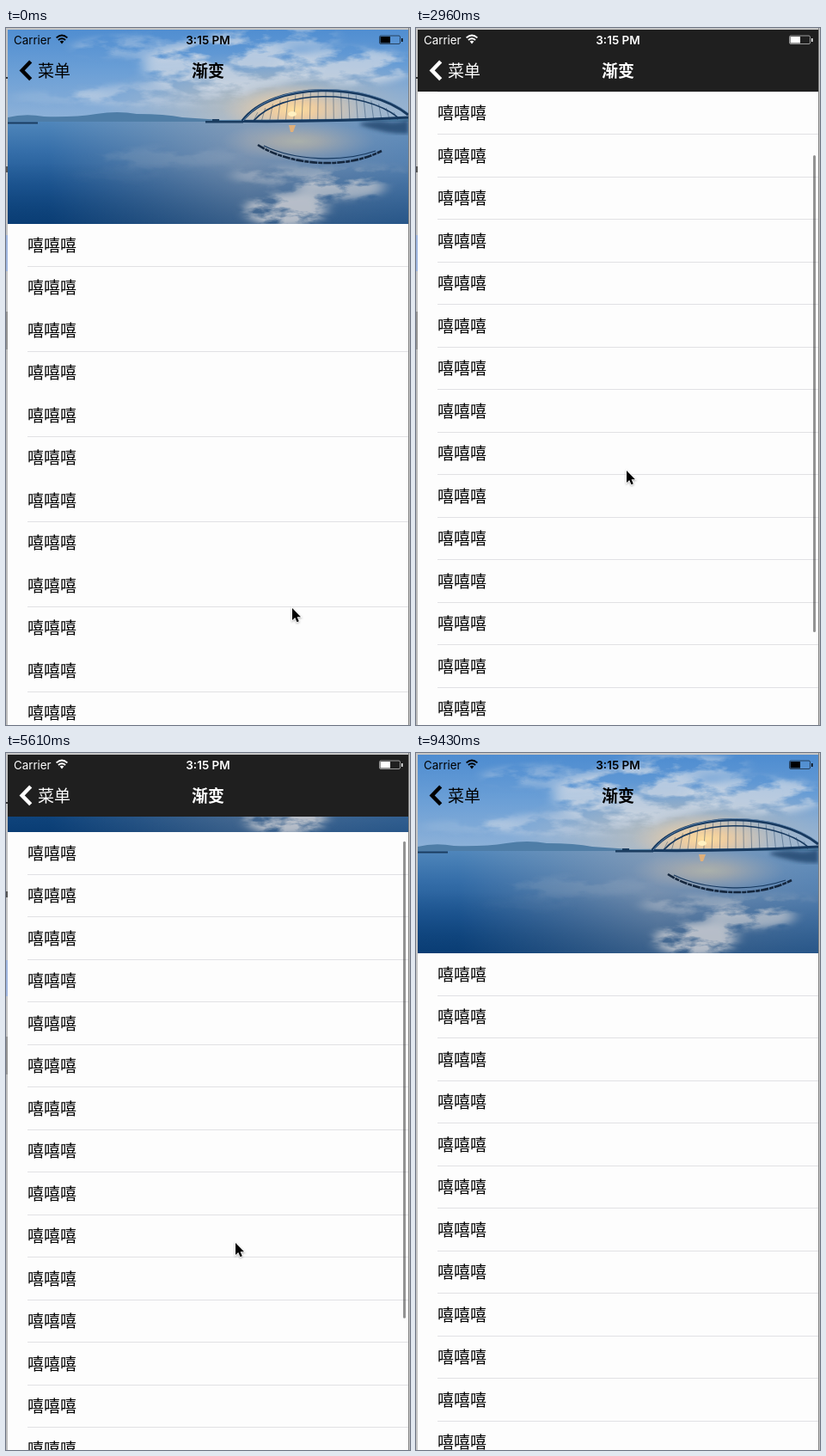
These frames come from a looping animation (470 px wide and 811 px high, 9.48 s). An HTML page:

```html
<!DOCTYPE html>
<html lang="zh">
<head>
<meta charset="utf-8">
<title>渐变</title>
<style>
html, body { margin: 0; width: 100%; height: 100%; overflow: hidden; }
body {
  position: relative; color: #000;
  background: linear-gradient(90deg, #c6c6c6 468px, #808080 468px 469px, #c9c9c9 469px);
  font-family: "Noto Sans CJK SC", "Noto Sans CJK", "Noto Sans CJK JP", sans-serif;
}
body > *, #phone > * { position: absolute; }
#edge {
  left: 0; top: 2px; width: 2px; height: 809px;
  background: linear-gradient(#c2c2c2 55px, #333 55px 57px, #c2c2c2 57px 159px, #555 159px 166px,
    #c4c4c4 166px 239px, #9fb6df 239px 281px, #c4c4c4 281px 328px, #959595 328px 372px, #bcbcbc 372px);
}
.last #edge { background: #c6c6c6; }
#phone { left: 2px; top: 2px; width: 466px; height: 809px; overflow: hidden; background: #fdfdfd; }
#photo { left: 0; top: 0; width: 466px; height: 236px; will-change: transform; }
.row, .line { left: 0; top: 0; width: 466px; }
.row { height: 50px; font-size: 19px; line-height: 48px; text-indent: 23px; background: #fdfdfd; }
.line { left: 23px; height: 1px; background: #e1e1e4; }
#bar { left: 0; top: 0; width: 466px; height: 72px; background: #1f1f1f; }
#nav { inset: 0 0 auto; height: 72px; }
#nav > * { position: absolute; white-space: nowrap; }
#nav svg { left: 0; top: 0; }
.status { top: 2px; line-height: 20px; font-family: Inter, Roboto, sans-serif; font-size: 13.3px; }
.label { top: 32px; line-height: 29px; font-size: 19px; }
.mid { left: 0; width: 466px; text-align: center; }
#thumb { left: 460px; top: 0; width: 3px; height: 555px; border-radius: 2px; background: rgba(0, 0, 0, .42); }
#cursor { left: 0; top: 0; overflow: visible; filter: drop-shadow(0 1px 1px rgba(0, 0, 0, .3)); }
</style>
</head>
<body>
<div id="edge"></div>
<div id="phone">
  <!-- drawn in stage coordinates of the resting list -->
  <svg id="photo" viewBox="2 -8 466 236">
    <defs>
      <linearGradient id="sky" x1="0" y1="0" x2="0" y2="1">
        <stop stop-color="#4a8ad0"/><stop offset=".5" stop-color="#6b9fd6"/><stop offset="1" stop-color="#8fb2d8"/>
      </linearGradient>
      <linearGradient id="water" x1="0" y1="0" x2="0" y2="1">
        <stop stop-color="#4f86bb"/><stop offset=".3" stop-color="#346da8"/>
        <stop offset=".65" stop-color="#1c5490"/><stop offset="1" stop-color="#083a70"/>
      </linearGradient>
      <linearGradient id="haze" x1="0" x2="1">
        <stop offset=".1" stop-color="#a5abb8" stop-opacity="0"/><stop offset=".6" stop-color="#a5abb8" stop-opacity=".6"/>
        <stop offset="1" stop-color="#7f9dc0" stop-opacity=".5"/>
      </linearGradient>
      <linearGradient id="deep" x1="0" y1="0" x2="0" y2="1">
        <stop offset=".4" stop-color="#0b4078" stop-opacity="0"/><stop offset="1" stop-color="#0b4078" stop-opacity=".5"/>
      </linearGradient>
      <radialGradient id="sun">
        <stop stop-color="#ffdf9c"/><stop offset=".3" stop-color="#f6cf9c" stop-opacity=".85"/>
        <stop offset="1" stop-color="#dccabc" stop-opacity="0"/>
      </radialGradient>
      <filter id="wisps" x="-30%" y="-30%" width="160%" height="160%" color-interpolation-filters="sRGB">
        <feGaussianBlur in="SourceGraphic" stdDeviation="9 5" result="soft"/>
        <feTurbulence type="fractalNoise" baseFrequency=".022 .055" numOctaves="5" seed="8"/>
        <feColorMatrix values="0 0 0 0 1  0 0 0 0 1  0 0 0 0 1  4.5 0 0 0 -1.6"/>
        <feComposite in="soft" operator="in"/>
        <feComposite in="soft" operator="in"/>
      </filter>
      <filter id="soft"><feGaussianBlur stdDeviation="2"/></filter>
    </defs>
    <rect x="2" y="-9" width="466" height="118" fill="url(#sky)"/>
    <ellipse cx="320" cy="88" rx="210" ry="62" fill="url(#sun)" opacity=".45"/>
    <g filter="url(#wisps)" fill="#d3dbe6">
      <ellipse cx="160" cy="22" rx="90" ry="16" opacity=".6"/>
      <ellipse cx="255" cy="46" rx="100" ry="30" opacity=".85"/>
      <ellipse cx="310" cy="10" rx="80" ry="16" opacity=".75"/>
      <ellipse cx="400" cy="45" rx="80" ry="24" opacity=".85"/>
      <ellipse cx="180" cy="78" rx="110" ry="16" opacity=".65"/>
      <ellipse cx="60" cy="80" rx="60" ry="10" opacity=".4"/>
    </g>
    <ellipse cx="336" cy="95" rx="85" ry="30" fill="url(#sun)"/>
    <path d="M2 104Q22 99 44 103Q80 104 105 100Q130 96 152 100Q185 100 205 104L250 107L468 105V110H2Z" fill="#44759f" opacity=".85"/>
    <rect x="2" y="109" width="466" height="120" fill="url(#water)"/>
    <rect x="2" y="109" width="466" height="120" fill="url(#haze)"/>
    <ellipse cx="340" cy="132" rx="90" ry="24" fill="url(#sun)" opacity=".4"/>
    <rect x="2" y="109" width="466" height="120" fill="url(#deep)"/>
    <g filter="url(#wisps)" fill="#c3c8cf">
      <ellipse cx="190" cy="150" rx="90" ry="14" opacity=".4"/>
      <ellipse cx="340" cy="172" rx="85" ry="14" opacity=".65"/>
      <ellipse cx="390" cy="186" rx="55" ry="16" opacity=".85"/>
      <ellipse cx="325" cy="212" rx="52" ry="22" opacity=".95"/>
      <ellipse cx="430" cy="168" rx="40" ry="10" opacity=".5"/>
      <ellipse cx="130" cy="172" rx="60" ry="10" opacity=".2"/>
    </g>
    <path d="M2 109.5H37V111.5H2ZM232 108H276V110.5H232ZM240 106H248V108H240Z" fill="#1b3d60"/>
    <path d="M412 111Q430 107 442 109T468 107V123Q440 123 412 113Z" fill="#1c4068" opacity=".75" filter="url(#soft)"/>
    <g fill="none" stroke="#17395f">
      <path d="M274 108.5Q370 109.5 468 104" stroke-width="3"/>
      <path d="M275 108C310 62 420 62 468 101" stroke-width="3.2"/>
      <path d="M276 108C310 61 420 61 468 99" stroke="#6c94bc" stroke-width=".8"/>
      <path d="M288 108C320 71 415 71 456 104" stroke-width="1.6"/>
      <path id="hangers" stroke-width=".7" opacity=".6"/>
      <path d="M293 136C330 160 395 165 437 143" stroke="#14263d" stroke-width="2.6" stroke-dasharray="9 1 5 1"/>
      <path d="M300 137C335 154 390 157 430 143" stroke-width="1.3"/>
    </g>
    <ellipse cx="333" cy="100" rx="5" ry="3" fill="#fff0c0"/>
    <path d="M329 113H337L334 121H331Z" fill="#f4b36c" opacity=".8"/>
  </svg>
  <div id="bar"></div>
  <div id="nav">
    <span class="status" style="left:7px">Carrier</span>
    <span class="status mid" style="font-weight:600;font-size:13.5px">3:15 PM</span>
    <svg width="466" height="72" viewBox="2 2 466 72" fill="none" stroke="currentColor">
      <path d="M58.6 11.4Q65 5.8 71.4 11.4M60.9 14Q65 10.5 69.1 14" stroke-width="1.9"/>
      <path d="M62.6 15.6Q65 13.8 67.4 15.6L65 18.4Z" fill="currentColor" stroke="none"/>
      <rect x="434.5" y="9" width="24" height="9.5" rx="1.5" opacity=".55"/>
      <path d="M435.5 10H447V17.5H435.5ZM460 12H461.5V16H460Z" fill="currentColor" stroke="none"/>
      <path d="M28.7 39L18.6 49.4L28.7 59.8" stroke-width="4.4"/>
    </svg>
    <span class="label" style="left:35px">菜单</span>
    <span class="label mid" style="font-weight:600">渐变</span>
  </div>
  <div id="thumb"></div>
</div>
<svg id="cursor" width="12" height="18">
  <path d="M0 0V14L3.2 11L5.5 16.2L7.8 15.2L5.6 10.2H10Z" stroke="#fff" stroke-width="1.6" paint-order="stroke"/>
</svg>
<script>
const LOOP = 9480, CUT = 9430, STEP = 147, LAST = 64;
const REST = 227.5, PITCH = 49.5, ROWS = 18;
// step, list top, pointer x, pointer y
const KEYS = [
  [0, REST, 333, 675], [2, REST, 331, 654], [3, REST, 331, 654],
  [7, 241, 285, 693], [9, REST, 262, 700], [14, 144.2, 250, 617],
  [20, 24.7, 245, 515], [27, 217, 258, 705], [31, 246, 258, 748], [32, 246, 258, 748],
  [38, 91.7, 267, 570], [41, 55, 268, 533], [47, 243.5, 266, 731], [48, 243.5, 266, 731],
  [51, REST, 267, 727], [56, REST, 271, 723], [57, REST, 382, 783], [58, REST, 382, 783],
  [60, REST, 416, 806], [LAST, 232.6, 416, 806]
];
const $ = id => document.getElementById(id);
const clamp = v => Math.max(0, Math.min(1, v));
const move = (el, x, y) => { el.style.transform = `translate(${x}px,${y}px)`; };

function add(cls, text = '') {
  const el = document.createElement('div');
  el.className = cls;
  el.textContent = text;
  $('phone').insertBefore(el, $('bar'));
  return el;
}
const rows = Array.from({ length: ROWS }, () => add('row', '嘻嘻嘻'));
const lines = rows.map(() => add('line'));

let hangers = '';
for (let i = 1; i < 20; i++) {
  const u = i / 20, x = 284 + 176 * u;
  hangers += `M${x} ${104 - 122 * u * (1 - u)}L${x + 10 * (u - .5)} 107`;
}
$('hangers').setAttribute('d', hangers);

function pose(n) {
  const i = Math.max(1, KEYS.findIndex(k => k[0] >= n));
  const a = KEYS[i - 1], b = KEYS[i], u = (n - a[0]) / (b[0] - a[0]);
  return a.map((v, j) => u === 1 ? b[j] : v + (b[j] - v) * u);
}

function draw(n) {
  const last = n === LAST;
  let [, y, px, py] = pose(n);
  // the list stays at rest until the final cut
  if (n > 56 && !last) y = REST;
  move($('photo'), 0, Math.round(y) - 238);
  rows.forEach((row, k) => {
    const next = y + PITCH * (k + 1);
    move(row, 0, Math.round(y + PITCH * k) - 2);
    move(lines[k], 0, Math.floor(next) - 2);
    // hairlines vanish when they straddle two pixels
    lines[k].style.opacity = Math.abs(next % 1 - .5) < .08 ? 0 : 1;
  });
  const solid = clamp((REST - y) / 128);
  $('bar').style.opacity = solid;
  $('nav').style.color = solid > .5 ? '#fff' : '#000';
  move($('thumb'), 0, 9 + (REST - y) * .676);
  $('thumb').style.opacity = n < 4 || last ? 0 : clamp((56 - n) / 4);
  move($('cursor'), px, py);
  $('cursor').style.visibility = last ? 'hidden' : 'visible';
  document.body.classList.toggle('last', last);
}

let shown = -1;
const start = performance.now();
function tick() {
  const t = (performance.now() - start) % LOOP;
  const n = t >= CUT ? LAST : Math.min(LAST - 1, Math.floor((t + 3) / STEP));
  if (n !== shown) draw(shown = n);
  requestAnimationFrame(tick);
}
tick();
</script>
</body>
</html>
```
